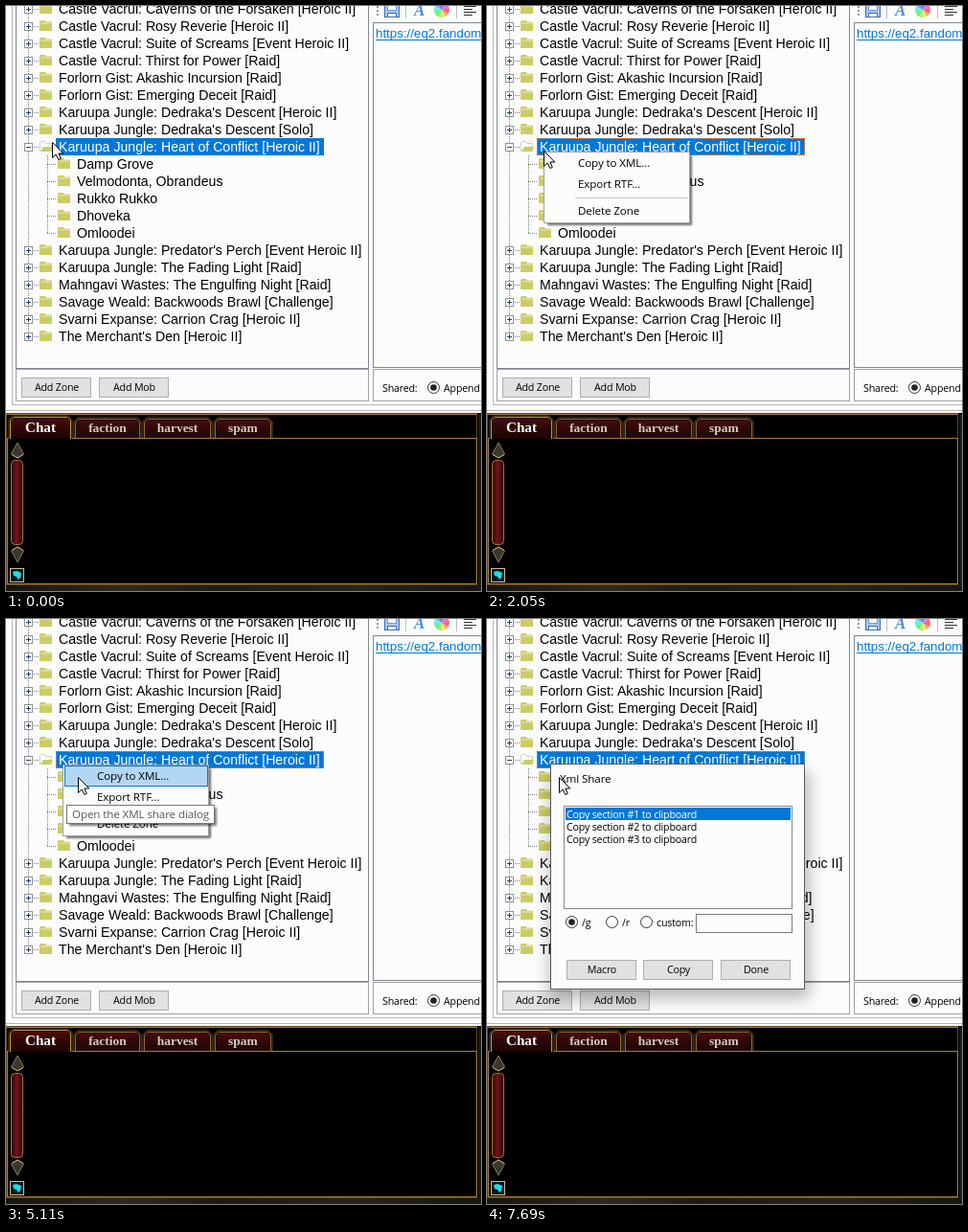
These frames come from a looping animation (496x611 px, 8 s). An HTML page:

```html
<!DOCTYPE html>
<html lang="en">
<head>
<meta charset="utf-8">
<title>Zone notes: XML share</title>
<style>
html, body { margin: 0; width: 100%; height: 100%; overflow: hidden; background: #fcfcfc; }
svg { display: block; position: absolute; left: 0; top: 0; }
text { white-space: pre; }
.tree { font: 14.15px "Liberation Sans", Arial, sans-serif; }
.link { font: 13.33px "Liberation Sans", Arial, sans-serif; }
.ui { font: 10.7px "Open Sans", sans-serif; letter-spacing: -.2px; }
.menuText { font: 11.6px "Open Sans", sans-serif; letter-spacing: -.1px; }
.tab { font: bold 13.5px "Liberation Serif", serif; }
.mid { text-anchor: middle; }
.crisp, rect { shape-rendering: crispEdges; }
.round { shape-rendering: auto; }
.dots { stroke: #808080; stroke-dasharray: 1 1; shape-rendering: crispEdges; }

#cursor, #menu, #hover, #tip, #dialog, #focus { animation: 8s step-end infinite; }
#cursor { animation-name: point; }
#menu { animation-name: menu; }
#hover { animation-name: hover; }
#tip { animation-name: tip; }
#dialog { animation-name: dialog; }
#focus { animation-name: focus; }
@keyframes point {
  0% { transform: translate(48px, 142px); }
  6.625% { transform: translate(58px, 154px); }
  12.875% { transform: translate(55px, 153px); }
  19.125% { transform: translate(59px, 151px); }
  38.375% { transform: translate(61px, 156px); }
  44.625% { transform: translate(75px, 165px); }
}
@keyframes menu {
  0% { visibility: hidden; }
  25.625% { visibility: visible; }
  83.375% { visibility: hidden; }
}
@keyframes hover {
  0% { visibility: hidden; }
  38.375% { visibility: visible; }
  83.375% { visibility: hidden; }
}
@keyframes tip {
  0% { visibility: hidden; }
  51.125% { visibility: visible; }
  83.375% { visibility: hidden; }
}
@keyframes dialog {
  0% { visibility: hidden; }
  83.375% { visibility: visible; }
}
@keyframes focus {
  0% { visibility: hidden; }
  25.625% { visibility: visible; }
}
</style>
</head>
<body>
<svg id="stage" width="496" height="611" viewBox="0 0 496 611">
  <defs>
    <linearGradient id="red" x2="0" y2="1">
      <stop offset="0" stop-color="#4a0d0f"/><stop offset=".5" stop-color="#300707"/><stop offset="1" stop-color="#1c0304"/>
    </linearGradient>
    <linearGradient id="bar">
      <stop offset="0" stop-color="#2c0506"/><stop offset=".45" stop-color="#74151a"/><stop offset="1" stop-color="#2c0506"/>
    </linearGradient>
    <linearGradient id="ground">
      <stop offset="0" stop-color="#17150f"/><stop offset=".25" stop-color="#302a1b"/><stop offset=".45" stop-color="#1d1b12"/>
      <stop offset=".75" stop-color="#28251a"/><stop offset="1" stop-color="#15140f"/>
    </linearGradient>
    <filter id="soft" x="-20%" y="-20%" width="140%" height="140%"><feGaussianBlur stdDeviation="8"/></filter>
    <filter id="tight" x="-10%" y="-20%" width="120%" height="140%"><feGaussianBlur stdDeviation=".8"/></filter>
    <g id="folder">
      <path d="M0 -3V5H13V-4H7L6 -6H1L0 -5Z" fill="#cccc66"/>
      <path d="M1 -3H12.500M7 -4.500H13" stroke="#e9e9b8" fill="none"/>
    </g>
    <g id="openFolder">
      <path d="M.5 4.500V-4.500L1.500 -5.500H5.500L6.500 -3.500H12.500V4.500Z" fill="#fff" stroke="#d2d2bc"/>
      <path d="M1 5L4 0H14L12 5Z" fill="#cccc66"/>
    </g>
  </defs>
</svg>
<script>
const BLUE = '#0078d7', PAPER = '#fcfcfc', EDGE = '#a0a0a0', GOLD = '#a57c38';

const rect = (x, y, w, h, fill, stroke) => stroke
  ? `<rect x="${x + .5}" y="${y + .5}" width="${w - 1}" height="${h - 1}" fill="${fill}" stroke="${stroke}"/>`
  : `<rect x="${x}" y="${y}" width="${w}" height="${h}" fill="${fill}"/>`;
const text = (x, y, s, kind, fill = '#000') => `<text x="${x}" y="${y}" class="${kind}" fill="${fill}">${s}</text>`;
const path = (d, fill, stroke = 'none', extra = '') => `<path d="${d}" fill="${fill}" stroke="${stroke}" ${extra}/>`;
const dots = d => `<path class="dots" d="${d}" fill="none"/>`;
const group = (id, ...parts) => `<g id="${id}">${parts.join('')}</g>`;
const shadow = (x, y, w, h, filter, alpha) =>
  `<rect x="${x}" y="${y}" width="${w}" height="${h}" filter="url(#${filter})" opacity="${alpha}"/>`;
const button = (x, y, label) => rect(x, y, 73, 21, '#e1e1e1', '#adadad') + text(x + 37, y + 14, label, 'ui mid');
const radio = (x, y, on) => `<circle cx="${x}" cy="${y}" r="6" fill="#fff" stroke="#333"/>` +
  (on ? `<circle cx="${x}" cy="${y}" r="3.300" fill="#222"/>` : '');

const SELECTED = 8;
const rows = [
  'Castle Vacrul: Caverns of the Forsaken [Heroic II]',
  'Castle Vacrul: Rosy Reverie [Heroic II]',
  'Castle Vacrul: Suite of Screams [Event Heroic II]',
  'Castle Vacrul: Thirst for Power [Raid]',
  'Forlorn Gist: Akashic Incursion [Raid]',
  'Forlorn Gist: Emerging Deceit [Raid]',
  "Karuupa Jungle: Dedraka's Descent [Heroic II]",
  "Karuupa Jungle: Dedraka's Descent [Solo]",
  'Karuupa Jungle: Heart of Conflict [Heroic II]',
  '>Damp Grove', '>Velmodonta, Obrandeus', '>Rukko Rukko', '>Dhoveka', '>Omloodei',
  "Karuupa Jungle: Predator's Perch [Event Heroic II]",
  'Karuupa Jungle: The Fading Light [Raid]',
  'Mahngavi Wastes: The Engulfing Night [Raid]',
  'Savage Weald: Backwoods Brawl [Challenge]',
  'Svarni Expanse: Carrion Crag [Heroic II]',
  "The Merchant's Den [Heroic II]"
];

function treeRow(label, i) {
  const y = 3 + 18 * i, child = label[0] === '>', open = i === SELECTED;
  const icon = `<use href="#${open ? 'openFolder' : 'folder'}" x="${child ? 54 : 35}" y="${y}"/>`;
  if (child) return dots(`M43 ${y + .5}H53`) + icon + text(74, y + 5, label.slice(1), 'tree');
  return dots(`M29 ${y + .5}H35`) + rect(19, y - 4, 9, 9, '#fff', '#919191') +
    path(`M21 ${y + .5}H26` + (open ? '' : `M23.500 ${y - 2}V${y + 3}`), 'none', '#24406e', 'class="crisp"') + icon +
    (open ? rect(52, y - 9, 280, 18, BLUE) : '') + text(55, y + 5, label, 'tree', open ? '#fff' : '#000');
}

function colorWheel(cx, cy, r) {
  const at = k => `${cx + r * Math.cos(k * Math.PI / 6)} ${cy + r * Math.sin(k * Math.PI / 6)}`;
  return Array.from({ length: 12 }, (_, k) =>
    path(`M${cx} ${cy}L${at(k)}A${r} ${r} 0 0 1 ${at(k + 1.05)}Z`, `hsl(${k * 30} 80% 68%)`)).join('');
}

const editor =
  rect(0, 0, 496, 425, PAPER) + rect(6, -1, 500, 418, PAPER, '#b8b8b8') +
  rect(10, -1, 369, 380, PAPER, '#828790') + rect(10, 379, 369, 34, PAPER, EDGE) +
  rect(383, 17, 120, 361, PAPER, '#828790') + rect(383, 379, 120, 34, PAPER, EDGE) +
  rect(0, 422, 496, 1, '#b4b4b4') +
  dots('M23.500 0V345') + dots('M43.500 156V238') + rows.map(treeRow).join('') +
  button(16, 388, 'Add Zone') + button(97, 388, 'Add Mob') +
  text(393, 403, 'Shared:', 'ui') + radio(446.5, 398.5, true) + text(457, 403, 'Append', 'ui') +
  text(386, 33, 'https://eq2.fandom', 'link', BLUE) + rect(386, 35, 110, 1, BLUE);

const toolbar =
  path('M387.500 0V12', 'none', '#999', 'stroke-width="2" stroke-dasharray="2 2" class="crisp"') +
  rect(395, -4, 16, 16, '#a9c6ef', '#3f6fba') + rect(398, -3, 10, 8, '#f4f8fe', '#6f9ad8') +
  rect(398, 7, 10, 5, '#f4f8fe', '#3f6fba') +
  rect(417, 0, 1, 13, '#bdbdbd') + rect(470, 0, 1, 13, '#bdbdbd') +
  '<text x="426" y="10" fill="#4a8ae0" style="font:italic bold 17px \'Liberation Serif\',serif">A</text>' +
  colorWheel(455, 4, 8) +
  [0, 3, 6, 9].map((y, i) => rect(478, y, i % 2 ? 9 : 13, 1, '#333')).join('');

function tab(x, w, top, label, size, fill, trim) {
  const d = `M${x + .5} 452V${top + 4}L${x + 4} ${top + .5}H${x + w - 4}L${x + w - .5} ${top + 4}V452`;
  return path(d, 'url(#red)', '#6b4c22', 'stroke-width="4"') + path(d, 'url(#red)', '#140a04', 'stroke-width="2.500"') +
    path(d, 'none', trim) +
    `<text x="${x + w / 2}" y="445" class="tab mid" fill="${fill}" style="font-size:${size}px">${label}</text>`;
}
const sideTab = (x, w, label) => tab(x, w, 431, label, 13.5, '#d2ccc2', '#946a34');
const arrow = (y, dir) => path(`M12 ${y - 8 * dir}L18.500 ${y + 4 * dir}L12 ${y + 8 * dir}L5.500 ${y + 4 * dir}Z`,
  '#3a372e', '#8d7c50') + path(`M6 ${y + 4.5 * dir}L12 ${y + 8 * dir}L18 ${y + 4.5 * dir}`, 'none', '#c4ad74');

const chat =
  rect(0, 425, 496, 186, '#000') + rect(0, 604, 496, 7, 'url(#ground)') + rect(493, 427, 3, 184, '#1b1912') +
  rect(0, 425, 492, 180, '#000', '#5f4520') + rect(0, 426, 492, 1, GOLD) +
  sideTab(72, 68, 'faction') + sideTab(144, 70, 'harvest') + sideTab(218, 59, 'spam') +
  rect(1, 451, 491, 153, '#000', GOLD) +
  tab(4, 64, 429, 'Chat', 15.2, '#fff', '#c2954c') + rect(3, 452, 66, 3, '#000') +
  arrow(464, 1) + arrow(573, -1) +
  `<rect class="round" x="5.500" y="474.500" width="12" height="88" rx="4" fill="url(#bar)" stroke="${GOLD}"/>` +
  rect(4, 587, 15, 15, '#071a1c', '#c9bd9f') +
  path('M7 591L11 590L16 592L15 597L13 599L11 596L8 595Z', '#16dfee');

const focus = group('focus', path('M52.500 138.500H331.500V155.500H52.500Z', 'none', '#ff8728', 'stroke-dasharray="1 1" class="crisp"'));

const menu = group('menu',
  shadow(63, 156, 151, 73, 'tight', .55),
  rect(59, 152, 153, 75, PAPER, EDGE),
  group('hover', rect(61, 153, 150, 22, '#b3d7f3', BLUE)),
  text(95, 168, 'Copy to XML...', 'menuText'), text(95, 190, 'Export RTF...', 'menuText'),
  rect(92, 200, 118, 1, '#c4c4c4'), text(95, 218, 'Delete Zone', 'menuText'));

const tip = group('tip',
  shadow(66, 197, 154, 19, 'tight', .5),
  rect(63, 194, 155, 20, '#fff', '#767676'),
  text(69, 208, 'Open the XML share dialog', 'menuText', '#575757'));

const dialog = group('dialog',
  shadow(65, 159, 272, 238, 'soft', .25),
  rect(66, 151, 266, 236, PAPER, '#595959'),
  text(76, 171, 'Xml Share', 'menuText'),
  rect(80, 195, 239, 108, PAPER, '#828790'), rect(82, 197, 235, 13, BLUE),
  [1, 2, 3].map(n => text(83, 195 + 13 * n, `Copy section #${n} to clipboard`, 'ui', n === 1 ? '#fff' : '#000')).join(''),
  radio(88.5, 316.5, true), text(99, 321, '/g', 'ui'),
  radio(130.5, 316.5), text(141, 321, '/r', 'ui'),
  radio(166.5, 316.5), text(177, 321, 'custom:', 'ui'),
  rect(218, 308, 101, 20, PAPER, '#7a7a7a'),
  button(83, 356, 'Macro'), button(163, 356, 'Copy'), button(244, 356, 'Done'));

const cursor = group('cursor', path('M.5 .5V16.500L4.200 13L6.800 18.500L9.300 17.400L6.900 12H11.800Z', '#fff', '#000'));

document.getElementById('stage').insertAdjacentHTML('beforeend',
  editor + toolbar + chat + focus + menu + tip + dialog + cursor);
</script>
</body>
</html>
```
